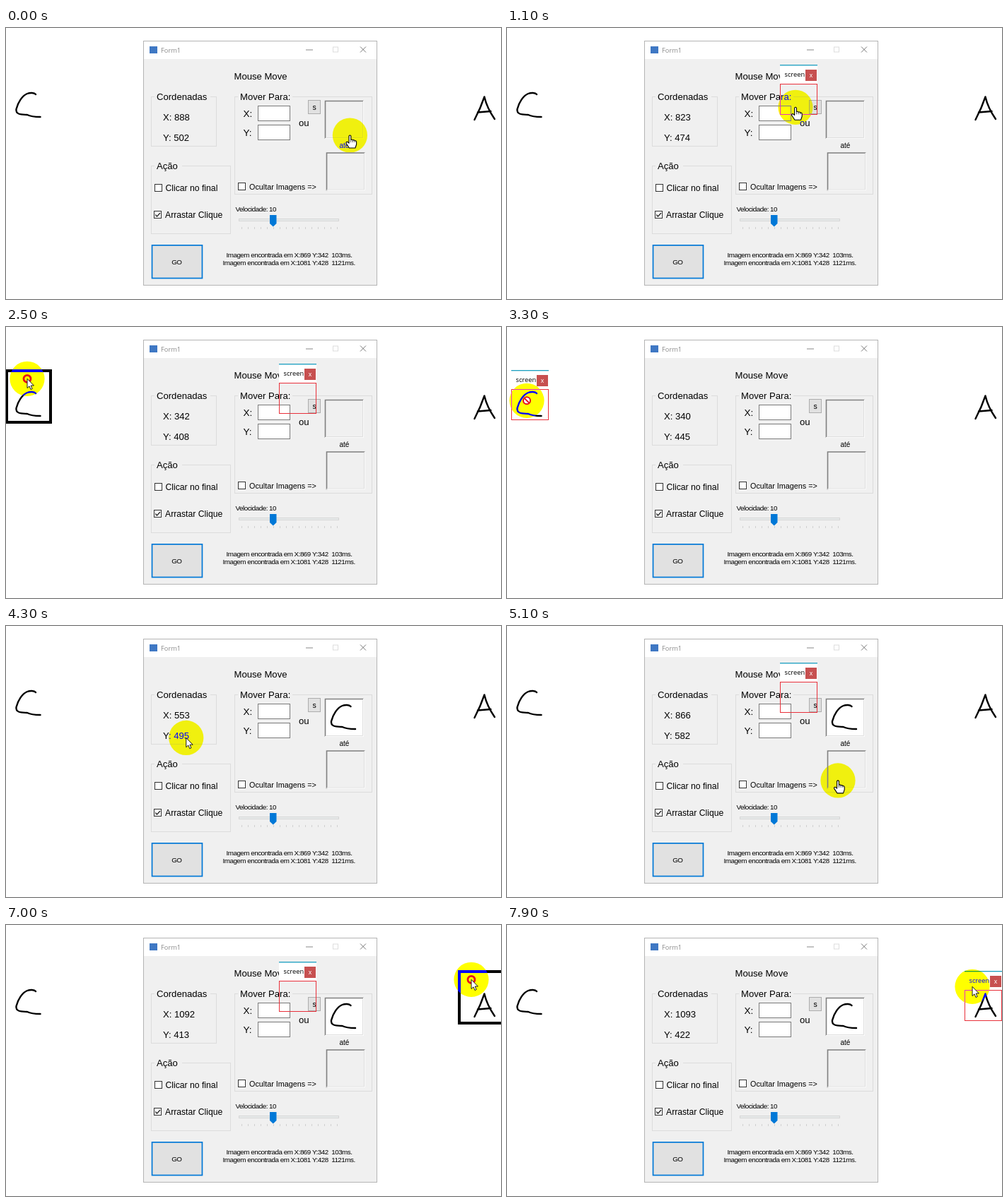
These frames come from a looping animation (700 by 384 pixels, 8 s). An HTML page with a canvas:

```html
<!DOCTYPE html>
<html lang="pt">
<head>
<meta charset="utf-8">
<title>Mouse Move</title>
<style>
html, body { margin: 0; width: 100%; height: 100%; overflow: hidden; background: #fff; }
canvas { display: block; width: 700px; height: 384px; }
</style>
</head>
<body>
<canvas id="stage" width="700" height="384"></canvas>
<script>
const ctx = document.getElementById('stage').getContext('2d');
const LOOP = 8000, STEP = 100, LAG = 70;
const SANS = '"Liberation Sans", Arial, sans-serif';
const UI = '"Open Sans", "Noto Sans", sans-serif';
const HOME = [386, 52];

// Pointer path: time, x, y
const path = [
  [0, 486.4, 152.7], [820, 486.4, 152.7], [1030, 432, 129.3], [1100, 408, 113],
  [1300, 410, 65], [1550, 410, 65], [1830, 220.4, 64.8], [1900, 171, 65],
  [2000, 94, 58], [2150, 44, 54], [2400, 30, 74], [2950, 30, 74],
  [3200, 28, 105], [3950, 28, 105], [4250, 220, 150], [4650, 468, 219.6],
  [5150, 468, 219.6], [5600, 397, 65], [5950, 397, 65], [6330, 498.1, 79],
  [6400, 537, 79], [6500, 587, 80], [6800, 654, 78], [7000, 658, 78],
  [7650, 658, 78], [7830, 658, 85.8], [7900, 658, 88], [8000, 658, 89]
];

const within = (t, ...spans) => spans.some(([a, b]) => t >= a && t < b);

function slope(i, k) {
  return (path[i + 1][k] - path[i][k]) / (path[i + 1][0] - path[i][0]);
}

function tangent(i, k) {
  if (i === 0 || i === path.length - 1) return 0;
  const a = slope(i - 1, k), b = slope(i, k);
  return a * b > 0 ? 2 * a * b / (a + b) : 0;
}

// Monotone cubic interpolation of the pointer path
function pointer(t) {
  t = Math.max(0, t);
  let i = 0;
  while (i < path.length - 2 && path[i + 1][0] <= t) i++;
  const h = path[i + 1][0] - path[i][0], u = (t - path[i][0]) / h;
  return [1, 2].map(k => {
    const p = path[i][k], q = path[i + 1][k];
    return p + (q - p) * u * u * (3 - 2 * u)
      + h * u * (1 - u) * (tangent(i, k) * (1 - u) - tangent(i + 1, k) * u);
  });
}

function text(s, x, y, size, color = '#000', font = SANS, align = 'left') {
  ctx.font = size + 'px ' + font;
  ctx.textAlign = align;
  ctx.fillStyle = color;
  ctx.fillText(s, x, y);
}

// Small labels are set tight
function smallText(s, x, y, align) {
  ctx.letterSpacing = '-0.48px';
  text(s, x, y, 9.8, '#000', SANS, align);
  ctx.letterSpacing = '0px';
}

function fill(x, y, w, h, color) {
  ctx.fillStyle = color;
  ctx.fillRect(x, y, w, h);
}

function frame(x, y, w, h, color, back) {
  if (back) fill(x, y, w, h, back);
  ctx.strokeStyle = color;
  ctx.lineWidth = 1;
  ctx.strokeRect(x + .5, y + .5, w - 1, h - 1);
}

function line(points, color, width = 1) {
  ctx.beginPath();
  points.forEach(p => ctx.lineTo(p[0], p[1]));
  ctx.strokeStyle = color;
  ctx.lineWidth = width;
  ctx.stroke();
}

function group(x, y, w, h, label, labelWidth) {
  frame(x, y, w, h, '#dcdcdc');
  fill(x + 5, y - 2, labelWidth, 5, '#f0f0f0');
  text(label, x + 8, y + 5, 13.1);
}

function checkbox(x, y, size, label, labelX, fontSize, on) {
  frame(x, y, size, size, '#333', '#fff');
  if (on) line([[x + 2.3, y + 5.5], [x + 4.5, y + 8], [x + 9, y + 3]], '#222', 1.3);
  text(label, labelX, y + size - 1, fontSize);
}

function pictureBox(x, y, back) {
  fill(x, y, 55, 54, back);
  line([[x + .5, y + 54], [x + .5, y + .5], [x + 55, y + .5]], '#808080', 1.6);
  line([[x + 53.5, y + 1], [x + 53.5, y + 52.5], [x + 1, y + 52.5]], '#dedede');
  line([[x + 54.5, y], [x + 54.5, y + 53.5], [x, y + 53.5]], '#fafafa');
}

function pen(draw, dx = 0, dy = 0) {
  ctx.save();
  ctx.translate(dx, dy);
  ctx.lineWidth = 2.4;
  ctx.lineCap = ctx.lineJoin = 'round';
  ctx.strokeStyle = '#000';
  ctx.beginPath();
  draw();
  ctx.stroke();
  ctx.restore();
}

function letterC() {
  ctx.moveTo(42, 94);
  ctx.bezierCurveTo(40, 91.5, 34, 91.5, 30, 93);
  ctx.bezierCurveTo(23, 96, 17, 105, 14.5, 115);
  ctx.bezierCurveTo(13.5, 123, 22, 122.5, 30, 123);
  ctx.quadraticCurveTo(36, 126, 48.5, 126);
}

function letterA() {
  ctx.moveTo(662.5, 130);
  ctx.quadraticCurveTo(671, 114, 676.5, 97.5);
  ctx.quadraticCurveTo(680, 113, 691, 129);
  ctx.moveTo(667, 119.5);
  ctx.lineTo(685.5, 118);
}

function drawForm(t) {
  fill(194, 18, 331, 347, '#f0f0f0');
  fill(194, 18, 331, 26, '#fff');
  frame(194, 18, 331, 347, '#b4b4b4');
  fill(203, 26, 11, 10, '#3f78c4');
  text('Form1', 219, 35, 9.3, '#8c8c8c', UI);
  line([[424, 31], [434, 31]], '#888');
  frame(462, 26.5, 8, 8, '#ddd');
  line([[501, 26.5], [509, 34.5]], '#777');
  line([[509, 26.5], [501, 34.5]], '#777');

  text('Mouse Move', 322.5, 73, 13.1);

  const [x, y] = pointer(t - LAG);
  group(205, 97, 93, 71, 'Cordenadas', 79);
  text('X: ' + Math.round(340 + (x - 28) / .8365), 222, 131, 13.1);
  text('Y: ' + Math.round(445 + (y - 105) / .8365), 222, 160, 13.1);

  group(323, 97, 195, 139, 'Mover Para:', 77);
  text('X:', 335.5, 126, 13.5);
  text('Y:', 335.5, 153, 13.5);
  frame(356, 110, 46, 22, '#7a7a7a', '#fff');
  frame(356, 137, 46, 22, '#7a7a7a', '#fff');
  frame(427, 102, 18, 20, '#adadad', '#e1e1e1');
  text('s', 436, 116, 10.5, '#000', SANS, 'center');
  text('ou', 414, 139, 13.2);
  text('até', 471.5, 170, 10);
  const captured = t >= 3900;
  pictureBox(451, 103, captured ? '#fff' : '#f0f0f0');
  if (captured) pen(letterC, 445.5, 20);
  pictureBox(453, 176.5, '#f0f0f0');
  checkbox(328, 219, 11, 'Ocultar Imagens =>', 344, 10.8);

  group(205, 195, 113, 97, 'Ação', 39);
  checkbox(210, 221, 11, 'Clicar no final', 225.5, 12.2);
  checkbox(209, 259, 11, 'Arrastar Clique', 225, 12.2, true);

  smallText('Velocidade: 10', 324.5, 260);
  frame(329, 270, 142, 4, '#d6d6d6', '#e7eaea');
  for (let i = 0; i < 16; i++) fill(333 + i * 9, 282, 1, 3, '#d0d0d0');
  ctx.fillStyle = '#0078d7';
  ctx.beginPath();
  [[373, 265], [382.5, 265], [382.5, 277], [377.8, 281.5], [373, 277]]
    .forEach(p => ctx.lineTo(p[0], p[1]));
  ctx.fill();

  fill(205.7, 307, 72.6, 48.4, '#0078d7');
  fill(207.4, 308.7, 69.2, 45, '#e1e1e1');
  smallText('GO', 241.3, 335, 'center');
  smallText('Imagem encontrada em X:869 Y:342  103ms.', 311.5, 325);
  smallText('Imagem encontrada em X:1081 Y:428  1121ms.', 306.5, 335.5);
}

function screenPlace(t) {
  if (within(t, [800, 2600], [4900, 7200])) return HOME;
  if (within(t, [2600, 3900])) return [6, 61];
  return t >= 7200 ? [647, 65] : null;
}

function drawScreen([x, y]) {
  fill(x, y, 53, 27, '#fff');
  fill(x, y, 53, 1.3, '#1c9fc0');
  text('screen', x + 6.5, y + 17, 9.3, '#000', UI);
  fill(x + 36, y + 7, 16, 16, '#c75050');
  text('x', x + 44, y + 18, 9, '#fff', SANS, 'center');
  frame(x, y + 27, 53, 44, '#e8303a');
}

function drawOutline(t) {
  if (!within(t, [1600, 2600], [6000, 7200])) return;
  const [x, y] = pointer(t - LAG);
  const grab = t < 4000 ? 410 : 397;
  ctx.globalCompositeOperation = 'difference';
  ctx.strokeStyle = '#fff';
  ctx.lineWidth = 4;
  ctx.strokeRect(Math.round(379 + x - grab) + 2, Math.round(y - 14) + 2, 62, 73);
  ctx.globalCompositeOperation = 'source-over';
}

function ring(width) {
  ctx.beginPath();
  ctx.arc(0, 0, 5, 0, 7);
  ctx.strokeStyle = '#e5101c';
  ctx.lineWidth = width;
  ctx.stroke();
}

const ARROW = 'M0 0V13.2L3 10.5 5 15.2 7.2 14.2 5.2 9.7H9.4Z';
const HAND = 'M-1.4 1Q0 -1 1.4 1V6.5Q3 5.2 4.1 7Q5.8 6 6.8 7.8Q9 7.2 9.2 9.5V13'
  + 'L7.5 18H-1L-5.3 11.5Q-5.8 9 -3.5 9.4L-1.4 11.2Z';

function drawPointer(t) {
  const [x, y] = pointer(t);
  ctx.save();
  ctx.translate(x, y - .7);
  ctx.globalCompositeOperation = 'difference';
  ctx.fillStyle = '#00f';
  ctx.beginPath();
  ctx.arc(0, 0, 24.6, 0, 7);
  ctx.fill();
  ctx.globalCompositeOperation = 'source-over';

  if (within(t, [3120, 3900])) {
    ctx.beginPath();
    ctx.arc(0, 0, 5, 0, 7);
    ctx.fillStyle = '#fff';
    ctx.fill();
    ring(2);
    line([[-3.6, -3.6], [3.6, 3.6]], '#e5101c', 2);
  } else {
    if (within(t, [500, 620], [1450, 2600], [4780, 4900], [5850, 7200])) ring(2.8);
    const hand = within(t, [0, 1180], [4550, 5450]);
    const shape = new Path2D(hand ? HAND : ARROW);
    ctx.fillStyle = '#fff';
    ctx.fill(shape);
    ctx.strokeStyle = '#000';
    ctx.lineWidth = hand ? 1.1 : .9;
    ctx.lineJoin = 'round';
    ctx.stroke(shape);
    if (hand) {
      for (const i of [1.4, 4.1, 6.8]) line([[i, 7], [i, 10]], '#000', .7);
    }
  }
  ctx.restore();
}

function draw(now) {
  const t = Math.floor(now % LOOP / STEP) * STEP;
  fill(0, 0, 700, 384, '#fff');
  pen(letterC);
  pen(letterA);
  drawForm(t);
  const place = screenPlace(t);
  if (place) drawScreen(place);
  drawOutline(t);
  drawPointer(t);
}

const start = performance.now();
function tick() {
  draw(performance.now() - start);
  requestAnimationFrame(tick);
}
tick();
</script>
</body>
</html>
```
